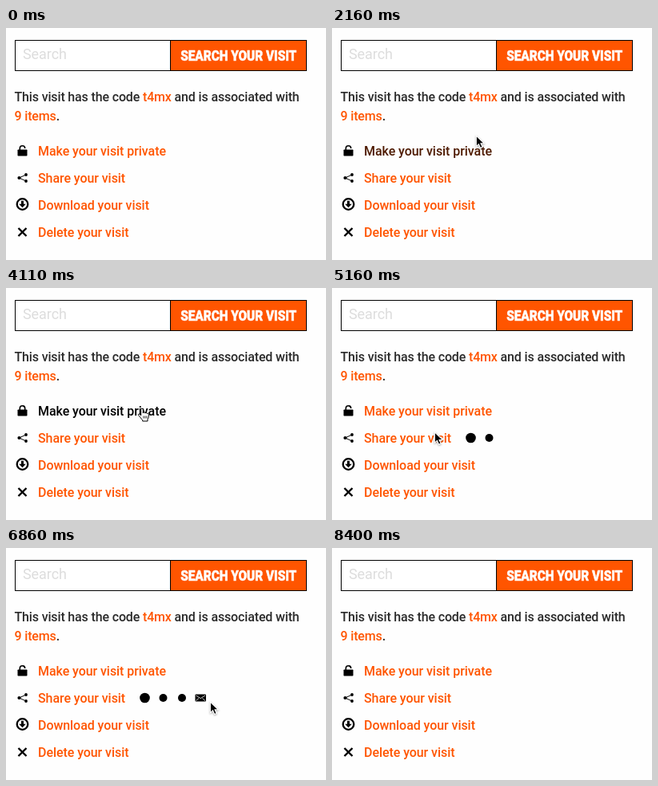
An HTML page for the animation above (8.89 s loop, 400 by 291 pixels).

```html
<!DOCTYPE html>
<html lang="en">
<head>
<meta charset="utf-8">
<title>Your visit</title>
<style>
  html, body { margin: 0; width: 100%; height: 100%; overflow: hidden; background: #fefefe; }
  svg { display: block; width: 400px; height: 291px; font: 500 16px Roboto, Arial, sans-serif; letter-spacing: -.07px; }
  .body { fill: #2a2a2a; letter-spacing: -.16px; }
  .link { fill: #f50; }
  .line { fill: none; stroke: #000; }
  .search { fill: #ddd; font-size: 18px; font-weight: 400; }
  .button { fill: #fff; stroke: #fff; stroke-width: .4; font-size: 15.4px; font-weight: 900; text-anchor: middle; }
  #arrow { filter: drop-shadow(0 1px 1px rgba(0, 0, 0, .35)); }
</style>
</head>
<body>
<svg viewBox="0 0 400 291">
  <rect x="11.5" y="15.5" width="364" height="38" fill="#fff" stroke="#000"/>
  <path d="M206 16h169v37H206z" fill="#f50"/>
  <path class="line" d="M205.5 16v37"/>
  <text class="search" x="21" y="39">Search</text>
  <text class="button" transform="translate(290.7 41) scale(1 1.2)">SEARCH YOUR VISIT</text>

  <text class="body" x="10.5" y="92">This visit has the code <tspan class="link">t4mx</tspan> and is associated with</text>
  <text class="body" x="10.5" y="116"><tspan class="link">9 items</tspan>.</text>

  <g>
    <rect x="14.5" y="152.5" width="12" height="8" rx=".8"/>
    <path class="line" stroke-width="1.6" d="M17.3 153v-2a3.2 3.2 0 0 1 6.4 0"/>
    <path id="leg" class="line" stroke-width="1.6" d="M23.7 150.8v2.4"/>
  </g>
  <g>
    <path class="line" d="M25 184 16.5 188l8.5 4"/>
    <circle cx="16.5" cy="188" r="2.1"/>
    <circle cx="25" cy="184" r="1.9"/>
    <circle cx="25" cy="192" r="1.9"/>
  </g>
  <g>
    <circle class="line" cx="20.5" cy="221" r="6.8" stroke-width="2.3"/>
    <path d="M19 216.8h3v4h2.8l-4.3 4.5-4.3-4.5H19z"/>
  </g>
  <path class="line" stroke-width="2.4" d="m15.5 251 10 10m0-10-10 10"/>

  <text id="private" class="link" x="40" y="160">Make your visit private</text>
  <text id="share" class="link" x="40" y="194">Share your visit</text>
  <text class="link" x="40" y="228">Download your visit</text>
  <text class="link" x="40" y="262">Delete your visit</text>

  <g id="icons">
    <circle cx="173.5" cy="188" r="6.3"/>
    <circle cx="196.5" cy="188" r="5"/>
    <circle cx="220" cy="188" r="5"/>
    <g>
      <rect x="236.5" y="183.5" width="13.5" height="9" rx="1"/>
      <path d="m237.5 185 5.7 3.6 5.8-3.6m-11.5 6.5 3.5-3m8 3-3.5-3" fill="none" stroke="#fff" stroke-width=".8"/>
    </g>
  </g>

  <g id="cursor">
    <path id="arrow" transform="translate(-2 -.5)" d="M1 1V14.5L4.1 11.6 6.2 16.4 8.8 15.3 6.7 10.7H11Z" stroke="#fff" stroke-width="1.1"/>
    <g id="hand" transform="translate(-6 -1)" fill="#fff" stroke="#000" stroke-linejoin="round">
      <path d="M4.2 10V2.4a1.3 1.3 0 0 1 2.6 0V7q.2-1.2 1.4-1.1t1.3 1.2q.3-.8 1.2-.7t1.2 1.2q.4-.6 1.1-.4t.8 1.3V11q0 2-1.3 3.6V17H6.2v-1.4Q4.5 14 3.4 12.2L1 9.6Q.4 8.4 1.4 8T4.2 10Z"/>
      <path d="M7.4 10.5v3m2-3v3m2-3v3" stroke-width=".8"/>
    </g>
  </g>
</svg>
<script>
const LOOP = 8890, FADE = 200, STAGGER = 85;
const $ = id => document.getElementById(id);
const clamp = u => Math.min(1, Math.max(0, u));
const smooth = u => u * u * (3 - 2 * u);

// each move eases the pointer from where it rests to a new place
const moves = [
  { from: 720, to: 721, x: 194, y: -3 },
  { from: 860, to: 1750, x: 182, y: 155 },
  { from: 1950, to: 2280, x: 181, y: 126 },
  { from: 2440, to: 2850, x: 179, y: 158 },
  { from: 3080, to: 3300, x: 178, y: 122 },
  { from: 3300, to: 3700, x: 176, y: 127 },
  { from: 3700, to: 3960, x: 170.5, y: 151 },
  { from: 4440, to: 5200, x: 129, y: 180.5 },
  { from: 5200, to: 5450, x: 128, y: 188 },
  { from: 6080, to: 7020, x: 267, y: 193 },
  { from: 7250, to: 7800, x: 369, y: 226 },
  { from: 7800, to: 7980, x: 355, y: 228 },
  { from: 8250, to: 8400, x: 355, y: 300 }
];

function pointer(t) {
  let x = 194, y = -40;
  for (const m of moves) {
    const k = smooth(clamp((t - m.from) / (m.to - m.from)));
    x += (m.x - x) * k;
    y += (m.y - y) * k;
  }
  return { x, y };
}

// times at which the pointer enters and leaves a box
function visits(left, top, right, bottom) {
  const found = [];
  let inside = false;
  for (let t = 0; t < LOOP; t += 5) {
    const { x, y } = pointer(t);
    const now = x > left && x < right && y > top && y < bottom;
    if (now && !inside) found.push({ enter: t, leave: LOOP });
    if (!now && inside) found[found.length - 1].leave = t;
    inside = now;
  }
  return found;
}

const areas = {
  private: visits(40, 143, 202, 164),
  share: visits(40, 182, 150, 198),
  icons: visits(164, 182, 252, 198),
  row: visits(11, 172, 380, 206)
};

const isOver = (area, t, delay = 0) =>
  areas[area].some(v => t >= v.enter + delay && t < v.leave);

const show = (el, on) => { el.style.visibility = on ? 'visible' : 'hidden'; };

function tint(id, t) {
  const dark = areas[id].reduce((sum, v) =>
    sum + clamp((t - v.enter) / FADE) - clamp((t - v.leave) / FADE), 0);
  const light = 1 - clamp(dark);
  $(id).style.fill = `rgb(${255 * light}, ${85 * light}, 0)`;
}

function draw(now) {
  const t = now % LOOP;
  const { x, y } = pointer(t);
  const pointing = ['private', 'share', 'icons'].some(a => isOver(a, t));
  $('cursor').setAttribute('transform', `translate(${x} ${y})`);
  show($('hand'), pointing);
  show($('arrow'), !pointing);
  show($('leg'), isOver('private', t));
  tint('private', t);
  tint('share', t);
  [...$('icons').children].forEach((el, i) => show(el, isOver('row', t, STAGGER * (i + 1))));
  requestAnimationFrame(() => draw(performance.now() - start));
}

const start = performance.now();
draw(0);
</script>
</body>
</html>
```
